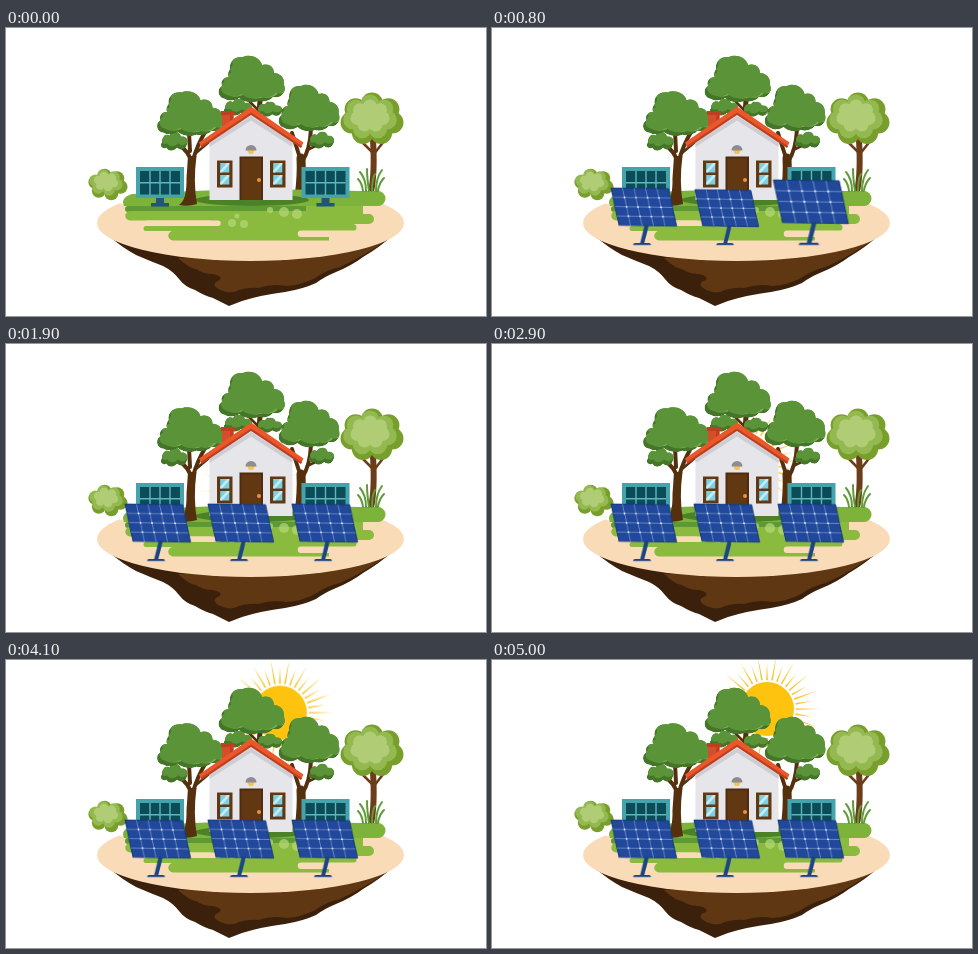
Recreate the animation shown at these times as an HTML page. Size 480 by 288 pixels, loop 5100 ms.

```html
<!DOCTYPE html>
<html lang="en">
<head>
<meta charset="utf-8">
<title>Solar house</title>
<style>
  html, body { margin: 0; width: 100%; height: 100%; overflow: hidden; background: #fff; }
  svg { display: block; width: 480px; height: 288px; }
  .rise { animation: rise 5.1s infinite; }
  .fade { animation: fade 5.1s linear infinite; }
  .pop { transform-origin: 0 57px; }
  .p1 { animation: pop1 5.1s ease-out infinite; }
  .p2 { animation: pop2 5.1s ease-out infinite; }
  .p3 { animation: pop3 5.1s ease-out infinite; }
  @keyframes pop1 {
    0%, 1.96% { transform: scale(0); }
    7.84% { transform: scale(1.14); }
    11.76% { transform: scale(.97); }
    14.71%, 100% { transform: none; }
  }
  @keyframes pop2 {
    0%, 5.88% { transform: scale(0); }
    11.76% { transform: scale(1.14); }
    15.69% { transform: scale(.97); }
    18.63%, 100% { transform: none; }
  }
  @keyframes pop3 {
    0%, 9.8% { transform: scale(0); }
    15.69% { transform: scale(1.14); }
    19.61% { transform: scale(.97); }
    22.55%, 100% { transform: none; }
  }
  @keyframes rise {
    0%, 37.25% { transform: translate(-30px, 98px); animation-timing-function: cubic-bezier(.333, 0, .667, .333); }
    62.25% { transform: translate(-15px, 49px); animation-timing-function: cubic-bezier(.333, .667, .667, 1); }
    87.25%, 100% { transform: translate(0, 0); }
  }
  @keyframes fade {
    0%, 35.5% { opacity: 0; }
    41%, 100% { opacity: 1; }
  }
</style>
</head>
<body>
<svg viewBox="0 0 480 288">
  <defs>
    <path id="crown" d="M3 30C-2 32-2 42 6 43C11 46 18 44 20 42C24 46 33 48 39 45C45 47 52 44 54 41C62 43 68 36 65 29C66 22 61 17 55 17C55 10 49 7 43 9C41 1 30-2 24 1C15 0 10 6 11 13C8 17 9 20 10 21C4 21 1 26 3 30Z"/>
    <path id="tuft" d="M2 10C2 4 7 2 10 4C13-1 21 0 22 5C28 4 31 9 28 13C26 18 20 17 18 15C14 19 8 18 7 15C2 17-1 13 2 10Z"/>
    <clipPath id="crownClip"><use href="#crown"/></clipPath>
    <clipPath id="tuftClip"><use href="#tuft"/></clipPath>
    <g id="canopy" clip-path="url(#crownClip)">
      <use href="#crown" fill="#447529"/>
      <use href="#crown" x="5" y="-4" fill="#82af57"/>
      <use href="#crown" x="2.5" y="-4" fill="#5b9438"/>
    </g>
    <g id="sprig" clip-path="url(#tuftClip)">
      <use href="#tuft" fill="#447529"/>
      <use href="#tuft" x="1" y="-4" fill="#5b9438"/>
    </g>
    <g id="window">
      <path fill="#623812" d="M0 0H15.5V27H0Z"/>
      <path fill="#7ccfe2" d="M3.2 2.5H12.3V12H3.2ZM3.2 14.5H12.3V24H3.2Z"/>
      <path fill="#c3ebf3" d="M3.2 10L10 2.5H12.3V4L5 12H3.2ZM3.2 22L10 14.5H12.3V16L5 24H3.2Z"/>
    </g>
    <g id="oldPanel">
      <path fill="#1f557c" d="M20 29H28V36H33V39.5H15V36H20Z"/>
      <path fill="#45a3ac" d="M0 0H48V31H0Z"/>
      <path fill="#0c4b58" d="M4 4H44V27.5H4Z"/>
      <path fill="none" stroke="#5bb8bd" stroke-width="1.4" d="M14 4V28M24 4V28M34 4V28M4 15.7H44"/>
    </g>
    <g id="panel"></g>
  </defs>

  <g class="rise"><g class="fade">
    <g id="rays" fill="#fbc52f"></g>
    <circle cx="275" cy="49" r="27" fill="#fec30e"/>
  </g></g>

  <!-- island -->
  <path fill="#3b210c" d="M104 209Q117 220 130 227Q144 233 157 238Q167 243 173 251Q179 259 189 262Q199 268 207 270L223 278L236 273Q255 267 279 264Q297 261 310 255Q318 249 330 244Q345 238 357 229Q374 219 386 208Z"/>
  <path fill="#5f3813" d="M172 230Q184 241 190 241Q197 246 207 246Q217 248 214 252Q205 255 211 260Q218 265 228 264Q240 259 252 260Q268 255 280 258Q296 257 309 250Q320 242 334 239Q362 226 385 209Z"/>
  <ellipse cx="244.5" cy="195" rx="153.5" ry="38" fill="#fadbb8"/>
  <path fill="#fff" d="M85 150H400V170H372L372 177H118L100 170H85Z"/>

  <!-- far trees -->
  <g fill="none" stroke="#54300f" stroke-linecap="round">
    <path stroke-width="5" d="M252 100L254 72"/>
    <path stroke-width="2.5" d="M253 84L262 75M252 82L242 72"/>
    <path stroke-width="9" d="M293 170Q296 147 295 130"/>
    <path stroke-width="4" d="M296 134Q304 122 305 101M294 130L286 105"/>
    <path stroke-width="2.5" d="M301 122L316 115"/>
  </g>
  <use href="#sprig" x="217" y="70"/>
  <use href="#sprig" transform="translate(250 73) scale(.9)"/>
  <use href="#canopy" x="213" y="28"/>
  <use href="#sprig" transform="translate(302 103) scale(.9 1)"/>
  <use href="#canopy" transform="translate(273 57) scale(.92 1)"/>

  <!-- right tree -->
  <g fill="none" stroke="#6b3d18" stroke-linecap="round">
    <path stroke-width="6" d="M365 164Q369 145 367 112"/>
    <path stroke-width="2.5" d="M367 125L354 112M368 126L382 108"/>
  </g>
  <g id="leaves"></g>

  <!-- grass -->
  <path fill="#7db23b" d="M118 178Q114 170 126 166Q245 159 352 163H372A7.5 7.5 0 0 1 372 178Z"/>
  <path fill="#5d9935" d="M122 178H310V184H122A3 3 0 0 1 122 178Z"/>
  <path fill="#8abb3f" d="M124 183H300V178H357V186H363A5 5 0 0 1 363 196H347A3.5 3.5 0 0 1 347 203H323V212.5H167A4.5 4.5 0 0 1 167 203H140A2.5 2.5 0 0 1 140 198H205V192.5H124A4.5 4.5 0 0 1 124 183Z"/>
  <path fill="#fadbb8" d="M140 192.5H212A2.7 2.7 0 0 1 212 198H140ZM295 202.5H354V209H295A3.2 3.2 0 0 1 295 202.5Z"/>
  <g fill="#b7d979" opacity=".7">
    <circle cx="278" cy="184" r="5"/><circle cx="291" cy="186" r="5"/>
    <circle cx="264" cy="182" r="3"/><circle cx="226" cy="195" r="4"/>
    <circle cx="238" cy="196" r="4"/><circle cx="231" cy="188" r="2.5"/>
  </g>
  <ellipse cx="246" cy="172" rx="57" ry="6" fill="#4b8228"/>
  <path fill="none" stroke="#5f9b37" stroke-width="2" stroke-linecap="round" d="M360 163Q360 151 354 144M363 163Q361 150 361 141M370 163Q370 150 376 142M366 163Q366 151 369 146M357 163Q356 155 352 151M372 163Q373 155 378 150"/>

  <!-- left tree -->
  <g fill="none" stroke="#54300f" stroke-linecap="round">
    <path stroke-width="4" d="M186 136Q184 124 171 115M187 132Q191 118 199 104M184 123L183 104"/>
    <path stroke-width="2.5" d="M190 125L203 114"/>
  </g>
  <path fill="#54300f" d="M173 177Q181 172 180.5 150L182 128H190.5Q187 154 191 176Q182 179 173 177Z"/>
  <use href="#sprig" transform="translate(154 103) scale(.95 1.12)"/>
  <use href="#canopy" transform="translate(151.5 63.5) scale(1 .96)"/>

  <!-- house -->
  <path fill="#d54e2b" d="M216 86H227.5V102H216Z"/>
  <path fill="#bf3f20" d="M215 83H229V87H215ZM224 87H227.5V97H224Z"/>
  <path fill="#e6e6ea" d="M245 82L286.5 111V172H203.5V111Z"/>
  <path fill="#cdcdd4" d="M245 88L286.5 114V119L245 92.5L203.5 119V114Z"/>
  <path fill="#e9572a" d="M245 78.5L297.5 114.5L295 119.5L245 86L195.500 119.5L193 114.500Z"/>
  <path fill="#bd3f20" d="M245 84.500L296 118L295 120L245 87L195.500 120L194.500 118Z"/>
  <path fill="#4f2b0f" d="M233.500 128.500H257V172H233.500Z"/>
  <path fill="#623812" d="M235.500 130.500H255V172H235.500Z"/>
  <circle cx="253" cy="152" r="2" fill="#f0903a"/>
  <path fill="#f4c552" d="M241 122H249L247 126H243Z"/>
  <path fill="#8e8b91" d="M239.500 122.500A5.500 5.500 0 0 1 250.500 122.500Z"/>
  <use href="#window" x="211" y="132.500"/>
  <use href="#window" x="264" y="132.500"/>

  <g id="bush"></g>
  <use href="#oldPanel" x="130" y="139"/>
  <use href="#oldPanel" x="295.500" y="139"/>

  <g transform="translate(151 160)"><use class="pop p1" href="#panel"/></g>
  <g transform="translate(234 160)"><use class="pop p2" href="#panel"/></g>
  <g transform="translate(318 160)"><use class="pop p3" href="#panel"/></g>
</svg>
<script>
  const $ = id => document.getElementById(id);
  const path = (d, attrs = '') => `<path d="${d}" ${attrs}/>`;

  // Tapered rays around the disc, long and short in turn
  const polar = (a, r) => [275 + r * Math.sin(a), 49 - r * Math.cos(a)].map(v => v.toFixed(2));
  $('rays').innerHTML = Array.from({ length: 36 }, (_, i) => {
    const a = i * Math.PI / 18, tip = i % 2 ? 54 : 46;
    return path(`M${polar(a - .03, 29)}L${polar(a, tip)}L${polar(a + .03, 29)}Z`);
  }).join('');

  // Round foliage: a ring of lobes, lit from the upper left
  function foliage(id, x, y, rx, ry, lobe, n) {
    const layer = (k, dx, dy, fill) => {
      let s = `<g fill="${fill}"><ellipse cx="${x + dx}" cy="${y + dy}" rx="${rx * k}" ry="${ry * k}"/>`;
      for (let i = 0; i < n; i++) {
        const a = (i + .25) * 2 * Math.PI / n;
        s += `<circle cx="${x + dx + rx * k * Math.cos(a)}" cy="${y + dy + ry * k * Math.sin(a)}" r="${lobe * k}"/>`;
      }
      return s + '</g>';
    };
    $(id).innerHTML = layer(1, 0, 0, '#789f2c') + layer(.85, -2, -2, '#93b950') + layer(.62, -2, -3, '#b0cd76');
  }
  foliage('leaves', 366, 91, 21, 15.5, 11, 7);
  foliage('bush', 102, 156.5, 13, 9, 7, 6);

  // Slanted panel, cells laid out in (u, v)
  const at = (u, v) => `${(-32 + 57.5 * u + 8 * v).toFixed(2)} ${(.8 * u + 37.3 * v).toFixed(2)}`;
  let lines = '', nodes = '';
  for (let i = 1; i < 5; i++) lines += `M${at(i / 5, 0)}L${at(i / 5, 1)}`;
  for (let j = 1; j < 4; j++) {
    lines += `M${at(0, j / 4)}L${at(1, j / 4)}`;
    for (let i = 1; i < 5; i++) nodes += `M${at(i / 5, j / 4)}h0`;
  }
  $('panel').innerHTML =
    path('M4 36L-1 56', 'stroke="#1c4584" stroke-width="4" fill="none"') +
    path('M-8 55H6Q8 55 8 57H-10Q-10 55-8 55Z', 'fill="#1c4584"') +
    path(`M${at(0, 0)}L${at(1, 0)}L${at(1, 1)}L${at(0, 1)}Z`,
      'fill="#21489a" stroke="#183a7c" stroke-width="1" stroke-linejoin="round"') +
    path(lines, 'fill="none" stroke="#7f9dd3" stroke-width=".7"') +
    path(nodes, 'fill="none" stroke="#e3ecfa" stroke-width="1.9" stroke-linecap="round"');
</script>
</body>
</html>
```
